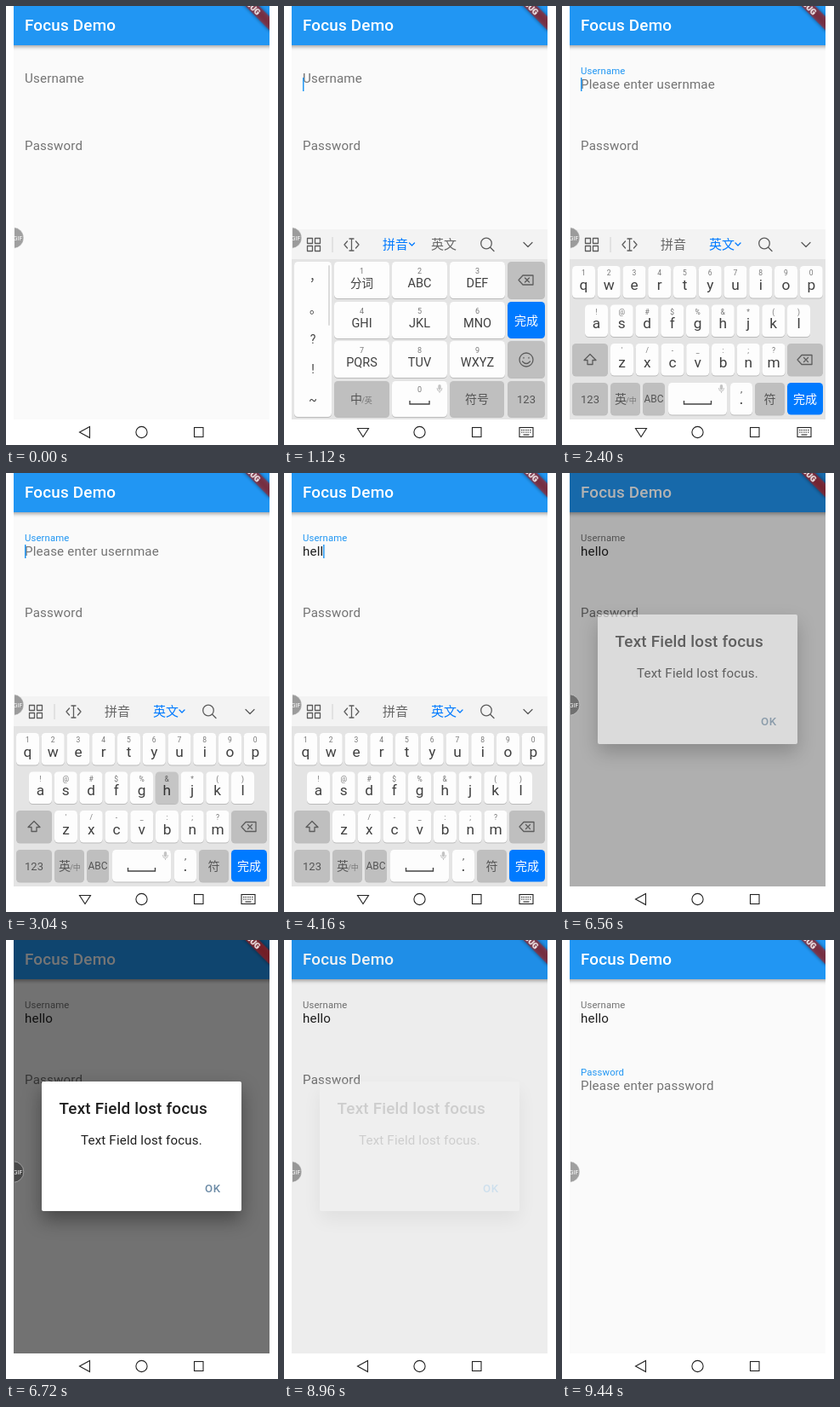
These frames come from a looping animation (320x515 px, 9.6 s). An HTML page:

```html
<!DOCTYPE html>
<html lang="en">
<head>
<meta charset="utf-8">
<title>Focus Demo</title>
<style>
html, body { margin: 0; width: 100%; height: 100%; overflow: hidden; background: #fff; }
svg { display: block; width: 320px; height: 515px; }
text { font-family: Roboto, "Noto Sans CJK SC", "Noto Sans CJK", sans-serif; }
.mid { text-anchor: middle; }
.title { font-size: 18.9px; font-weight: 500; letter-spacing: .17px; }
.field { font-size: 15.15px; letter-spacing: .16px; }
.soft { fill: rgba(0,0,0,.54); }
.bar { fill: #2196f3; filter: drop-shadow(0 2px 2px rgba(0,0,0,.35)); }
.line { fill: none; stroke: #5c5c5c; stroke-width: 1.3; stroke-linecap: round; stroke-linejoin: round; }
.line.blue { stroke: #007aff; }
.nav { fill: none; stroke: #222; stroke-width: 1.1; }
.key { fill: #fdfdfd; filter: drop-shadow(0 1px .4px rgba(0,0,0,.18)); }
.key.grey { fill: #bfbfbf; }
.key.blue { fill: #007aff; filter: none; }
.sheet { fill: #fff; filter: drop-shadow(0 10px 11px rgba(0,0,0,.38)); }

.anim { animation: 9600ms step-end infinite; }
#userLabel { animation-name: userLabel; }
#passLabel { animation-name: passLabel; }
#userHint { animation-name: userHint; }
#passHint { animation-name: passHint; }
#reveal { animation-name: type; }
#caret { animation-name: type, blink; }
#nine { animation-name: nine; }
#qwerty { animation-name: qwerty; }
#pinyinOn { animation-name: pinyinOn; }
#englishOn { animation-name: englishOn; }
#tools { animation-name: tools; }
#navBack { animation-name: navBack; }
#navIme { animation-name: navIme; }
#barrier { animation-name: barrier; }
#dialog { animation-name: dialog; }
#ok { animation-name: ok; }
.press { animation-name: press; opacity: 0; }

@keyframes userLabel {
  0% { transform: translate(22px,90.2px); fill: rgba(0,0,0,.54); }
  13.33% { transform: translate(22px,80px) scale(.75); fill: #2196f3; }
  66.66%, 100% { transform: translate(22px,80px) scale(.75); fill: rgba(0,0,0,.54); }
}
@keyframes passLabel {
  0% { transform: translate(22px,169px); fill: rgba(0,0,0,.54); }
  96.66% { transform: translate(22px,163px) scale(.86); fill: #4a86b8; }
  98.33%, 100% { transform: translate(22px,158.8px) scale(.75); fill: #2196f3; }
}
@keyframes userHint { 0% { opacity: 0 } 13.33% { opacity: 1 } 33.33%, 100% { opacity: 0 } }
@keyframes passHint { 0% { opacity: 0 } 98.33%, 100% { opacity: 1 } }
@keyframes type {
  0% { transform: none; }
  33.33% { transform: translateX(8.4px); }
  36.66% { transform: translateX(16.5px); }
  39.99% { transform: translateX(20.3px); }
  43.33% { transform: translateX(24.1px); }
  48.33%, 100% { transform: translateX(32.6px); }
}
@keyframes blink {
  0%, 18.33%, 28.33%, 53.33%, 66.66%, 100% { opacity: 0; }
  8.33%, 23.33%, 31.66%, 59.99% { opacity: 1; }
}
@keyframes tools {
  0%, 66.66%, 100% { opacity: 0; transform: translateY(223px); }
  8.33% { opacity: .6; transform: translateY(110px); }
  9.99% { opacity: .9; transform: translateY(25px); }
  11.66% { opacity: 1; transform: none; }
}
@keyframes nine { 0% { opacity: 1 } 24.99%, 100% { opacity: 0 } }
@keyframes qwerty { 0% { opacity: 0 } 24.99%, 100% { opacity: 1 } }
@keyframes pinyinOn { 0% { opacity: 1 } 23.33%, 100% { opacity: 0 } }
@keyframes englishOn { 0% { opacity: 0 } 23.33%, 100% { opacity: 1 } }
@keyframes navBack { 0%, 63.33%, 100% { opacity: 1 } 8.33% { opacity: 0 } }
@keyframes navIme { 0%, 63.33%, 100% { opacity: 0 } 8.33% { opacity: 1 } }
@keyframes barrier { 0%, 94.99%, 100% { opacity: 0 } 68.33% { opacity: .3 } 69.99% { opacity: .54 } 93.33% { opacity: .05 } }
@keyframes dialog { 0%, 94.99%, 100% { opacity: 0 } 68.33% { opacity: .55 } 69.99% { opacity: 1 } 93.33% { opacity: .15 } }
@keyframes ok { 0% { fill: #6c8ba6 } 93.33%, 100% { fill: #2196f3 } }
@keyframes press { 0% { opacity: 1 } 1.66%, 100% { opacity: 0 } }
</style>
</head>
<body>
<svg viewBox="0 0 320 515">
  <defs>
    <clipPath id="screen"><rect x="9" width="301" height="515"/></clipPath>
    <clipPath id="edge"><rect x="10" y="255" width="20" height="34"/></clipPath>
    <clipPath id="typed"><rect id="reveal" class="anim" x="-78" y="80" width="100" height="24"/></clipPath>
    <filter id="blur" x="-20%" y="-100%" width="140%" height="300%"><feGaussianBlur stdDeviation="2.2"/></filter>
    <path id="chevron" class="line blue" d="M-3-1.5 0 1.5 3-1.5"/>
    <g id="erase" class="line"><path d="M-9 0-4-5.5H8V5.5H-4ZM-1.5-2.5 3.5 2.5M3.5-2.5-1.5 2.5"/></g>
    <g id="mic" fill="#c4c4c4"><rect x="-1.7" y="-5" width="3.4" height="6.5" rx="1.7"/><path d="M-3-1Q-3 3 0 3T3-1M0 3V5" fill="none" stroke="#c4c4c4"/></g>
  </defs>
  <g clip-path="url(#screen)">
    <rect x="9" width="301" height="485" fill="#fafafa"/>
    <rect class="bar" x="0" y="-10" width="320" height="56"/>
    <text class="title" x="22" y="29" fill="#fff">Focus Demo</text>

    <text id="userLabel" class="field anim">Username</text>
    <text id="passLabel" class="field anim">Password</text>
    <text id="userHint" class="field soft anim" x="22" y="97">Please enter usernmae</text>
    <text id="passHint" class="field soft anim" x="22" y="175.5">Please enter password</text>
    <g clip-path="url(#typed)"><text class="field" x="22" y="97" fill="#1f1f1f">hello</text></g>
    <rect id="caret" class="anim" x="22" y="84" width="1.5" height="16" fill="#2196f3"/>

    <rect id="barrier" class="anim" x="9" width="301" height="485"/>
    <g id="dialog" class="anim">
      <rect class="sheet" x="42" y="166" width="235" height="152" rx="2"/>
      <text class="title" x="62.5" y="204" fill="#1f1f1f">Text Field lost focus</text>
      <text class="field" x="88" y="240" fill="#1f1f1f">Text Field lost focus.</text>
      <text id="ok" class="anim" x="234" y="295.5" font-size="13.2" font-weight="500" letter-spacing=".6">OK</text>
    </g>

    <g transform="translate(310 -25) rotate(45)">
      <rect x="-40" y="26.4" width="80" height="11.3" opacity=".5" filter="url(#blur)"/>
      <rect x="-40" y="26.4" width="80" height="11.3" fill="#b71c1c" opacity=".6"/>
      <text class="mid" y="35.5" font-size="9.6" font-weight="900" fill="#fff">DEBUG</text>
    </g>

    <g id="tools" class="anim">
      <rect x="9" y="262" width="301" height="223" fill="#f3f3f3"/>
      <rect x="9" y="297" width="301" height="188" fill="#e4e4e4"/>
      <path class="line" d="M27.5 272.5h6v6h-6zM36.5 272.5h6v6h-6zM27.5 281.5h6v6h-6zM36.5 281.5h6v6h-6z"/>
      <path d="M57 271V289" stroke="#d0d0d0"/>
      <path class="line" d="M74.5 276 71 280l3.5 4M84.5 276l3.5 4-3.5 4M77 273h5M77 287h5M79.5 273v14"/>
      <circle class="line" cx="238" cy="278.5" r="6.3"/>
      <path class="line" d="M242.7 283.2 247 287.5M282 277.5l5 5 5-5"/>
      <g id="pinyinOn" class="anim"></g>
      <g id="englishOn" class="anim"></g>
      <g id="nine" class="anim"></g>
      <g id="qwerty" class="anim"></g>
    </g>

    <g clip-path="url(#edge)">
      <circle cx="8.5" cy="272" r="12.3" fill="#000" fill-opacity=".36" stroke="#fff" stroke-opacity=".5" stroke-width=".8"/>
      <text class="mid" x="14" y="274.6" font-size="7" fill="#fff">GIF</text>
    </g>

    <rect x="9" y="485" width="301" height="30" fill="#fff"/>
    <g class="nav">
      <circle cx="159.5" cy="500" r="6.6"/>
      <rect x="221.5" y="494.5" width="10.5" height="11"/>
      <path id="navBack" class="anim" d="M86.5 500 98.5 493.5V506.5Z"/>
      <g id="navIme" class="anim">
        <path d="M86.5 495.5H99.5L93 505.5Z"/>
        <rect x="277" y="494.5" width="16" height="11"/>
        <path d="M279 497.5h12M279 500h12" stroke-dasharray="1.5 1"/><path d="M281.5 503h7"/>
      </g>
    </g>
  </g>
</svg>
<script>
const BLUE = '#007aff';
const $ = id => document.getElementById(id);

const esc = s => s.replace(/&/g, '&amp;');
const label = (s, x, y, size, fill = '#404040', weight = 400) =>
  `<text class="mid" x="${x}" y="${y}" font-size="${size}" font-weight="${weight}" fill="${fill}">${esc(s)}</text>`;
const key = (x, y, w, h, kind = '') =>
  `<rect class="key ${kind}" x="${x}" y="${y}" width="${w}" height="${h}" rx="4.5"/>`;
const icon = (id, x, y) => `<use href="#${id}" x="${x}" y="${y}"/>`;
const space = (x, y, w) =>
  `<path d="M${x - w / 2} ${y}v4h${w}v-4" fill="none" stroke="#444" stroke-width="1.4"/>`;
const mode = (big, small, x, y) =>
  label(big, x - 6, y, 14, '#555') + label('/' + small, x + 6.5, y, 9, '#777');
const tabs = (pinyin, english, arrowX) =>
  label('拼音', 131, 285, 15, pinyin) + label('英文', 188, 285, 15, english) + icon('chevron', arrowX, 279.5);

function nineKeys() {
  const cols = [59, 127, 195], rows = [300, 347, 393];
  const names = ['分词', 'ABC', 'DEF', 'GHI', 'JKL', 'MNO', 'PQRS', 'TUV', 'WXYZ'];
  let out = key(12, 300, 44, 182) + '<rect x="52" y="304" width="2" height="71" rx="1" fill="#dcdcdc"/>';
  ['，', '。', '?', '!', '~'].forEach((c, i) =>
    out += label(c, i < 2 ? 37 : 34, [322, 360, 396, 431, 467][i], 14));
  names.forEach((name, i) => {
    const x = cols[i % 3], y = rows[i / 3 | 0];
    out += key(x, y, 65, 43) + label(String(i + 1), x + 32.5, y + 14, 9, '#777')
      + label(name, x + 32.5, y + 30, i ? 14.5 : 13.5, '#404040', i ? 400 : 500);
  });
  out += key(263, 300, 44, 43, 'grey') + icon('erase', 285, 321.5)
    + key(263, 347, 44, 43, 'blue') + label('完成', 285, 373.5, 14, '#fff')
    + key(263, 393, 44, 43, 'grey')
    + '<g class="line"><circle cx="285" cy="415" r="8"/><path d="M280.5 417q4.5 5 9 0M282 412.5v.5M288 412.5v.5"/></g>'
    + key(59, 440, 65, 42, 'grey') + mode('中', '英', 91, 466)
    + key(127, 440, 65, 42) + label('0', 159.5, 453, 9, '#777') + space(159.5, 463, 23) + icon('mic', 183, 449)
    + key(195, 440, 64, 42, 'grey') + label('符号', 227, 466, 14, '#555')
    + key(263, 440, 44, 42, 'grey') + label('123', 285, 466, 13, '#555');
  return out;
}

function qwertyKeys() {
  const rows = [
    [12, 305, 'qwertyuiop', '1234567890'],
    [27, 350.5, 'asdfghjkl', '!@#$%&*()'],
    [57, 396, 'zxcvbnm', "'/-_:;?"]
  ];
  const spot = {};
  let out = '';
  for (const [x0, y, letters, marks] of rows)
    [...letters].forEach((c, i) => {
      const x = x0 + 29.75 * i;
      spot[c] = [x, y];
      out += key(x, y, 27, 37.5) + label(marks[i], x + 13.5, y + 11, 8.5, '#777')
        + label(c, x + 13.5, y + 27.5, 17.3);
    });
  out += key(12, 396, 42, 37.5, 'grey') + '<path class="line" d="M33 408.5l-7 7h4v5h6v-5h4z"/>'
    + key(265, 396, 42, 37.5, 'grey') + icon('erase', 286, 415)
    + key(12, 442, 42, 37.5, 'grey') + label('123', 33, 465.5, 13, '#555')
    + key(57, 442, 35, 37.5, 'grey') + mode('英', '中', 75, 466)
    + key(95, 442, 26, 37.5, 'grey') + label('ABC', 108, 465, 12, '#555')
    + key(125, 442, 69, 37.5) + space(159.5, 463, 32) + icon('mic', 187.5, 449)
    + key(198, 442, 26, 37.5) + label(',', 211, 453, 11) + label('.', 211, 467, 19)
    + key(227, 442, 35, 37.5, 'grey') + label('符', 244.5, 466, 14, '#555')
    + key(265, 442, 42, 37.5, 'blue') + label('完成', 286, 466, 14, '#fff');
  const taps = [['h', 3040], ['e', 3360], ['l', 3680], ['l', 4000], ['o', 4480]];
  for (const [c, at] of taps) {
    const [x, y] = spot[c];
    out += `<rect class="press anim" x="${x}" y="${y}" width="27" height="37.5" rx="4.5" `
      + `fill="rgba(0,0,0,.22)" style="animation-delay:${at}ms"/>`;
  }
  return out;
}

$('pinyinOn').innerHTML = tabs(BLUE, '#666', 150.5);
$('englishOn').innerHTML = tabs('#666', BLUE, 207);
$('nine').innerHTML = nineKeys();
$('qwerty').innerHTML = qwertyKeys();
</script>
</body>
</html>
```
